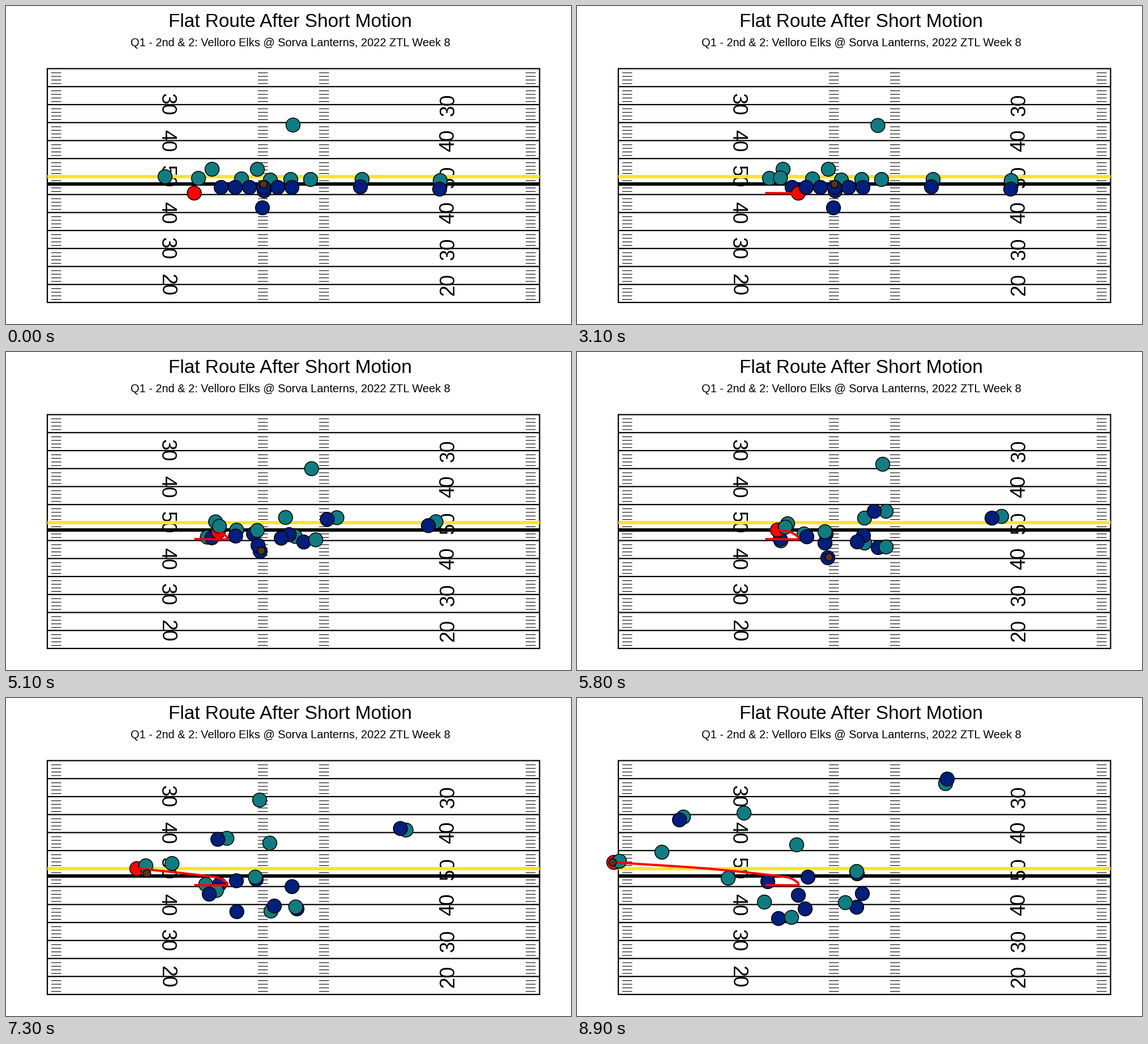
Write a matplotlib script that moves like this. It is 998x561 px and loops after 10 s.

```python
import numpy as np
import matplotlib.pyplot as plt
from matplotlib.animation import FuncAnimation
from matplotlib.patches import Circle, Rectangle

W, H, DPI = 998, 561, 64
PX = 72 / DPI                       # one pixel in points
START, SNAP, BREAK, CATCH, END = 10, 39, 58, 73, 89
TIME = np.arange(END + 1)

TEAL, NAVY, RED, BROWN = "#107c82", "#001e7b", "#ff0000", "#57341a"
YELLOW = "#ffe526"

LEFT, RIGHT, TOP, BOTTOM = 73, 942.5, 110.5, 523
STEP = (BOTTOM - TOP) / 13          # five yards

plt.rcParams["font.family"] = "Liberation Sans"
fig = plt.figure(figsize=(W / DPI, H / DPI), dpi=DPI, facecolor="white")
ax = fig.add_axes([0, 0, 1, 1])
ax.set_xlim(0, W)
ax.set_ylim(H, 0)
ax.axis("off")


def draw_field():
    ink = dict(color="black", snap=False, zorder=1)
    ax.hlines([TOP + k * STEP for k in range(1, 13)], LEFT, RIGHT, lw=2.2 * PX, **ink)
    ax.add_patch(Rectangle((LEFT, TOP), RIGHT - LEFT, BOTTOM - TOP, fill=False,
                           lw=2.2 * PX, **ink))
    yards = [TOP + 1 + k * STEP / 5 for k in range(65) if k % 5]
    for x in (80, 445, 553, 918):
        ax.hlines(yards, x, x + 17.5, lw=1.1 * PX, **ink)
    for k, label in enumerate(("30", "40", "50", "40", "30", "20")):
        y = TOP + (2 + 2 * k) * STEP
        for x, turn in ((274, -90), (791.6, 90)):
            ax.text(x, y, label, size=35.5 * PX, rotation=turn, ha="center",
                    va="baseline", rotation_mode="anchor", zorder=2)
    for y, color in ((314, "black"), (301, YELLOW)):
        ax.hlines(y, LEFT, RIGHT, color=color, lw=6 * PX, snap=False, zorder=3)


def draw_titles():
    ax.text(501.5, 37, "Flat Route After Short Motion", size=33.4 * PX,
            ha="center", va="baseline")
    ax.text(502, 70.7, "Q1 - 2nd & 2: Velloro Elks @ Sorva Lanterns, 2022 ZTL Week 8",
            size=20 * PX, ha="center", va="baseline")


def smooth(keys, vals):
    """Cubic curve over TIME that never overshoots its key values."""
    keys, vals = np.array(keys, float), np.array(vals, float)
    gap = np.diff(keys)
    sec = np.diff(vals) / gap
    a, b = sec[:-1], sec[1:]
    same = a * b > 0
    inner = np.where(same, 2 * a * b / np.where(same, a + b, 1), 0)
    slope = np.concatenate([sec[:1], inner, sec[-1:]])
    t = np.clip(TIME, keys[0], keys[-1])
    i = np.clip(np.searchsorted(keys, t, side="right") - 1, 0, len(gap) - 1)
    h = gap[i]
    u = (t - keys[i]) / h
    return ((1 + 2 * u) * (1 - u) ** 2 * vals[i] + u * (1 - u) ** 2 * h * slope[i]
            + u * u * (3 - 2 * u) * vals[i + 1] + u * u * (u - 1) * h * slope[i + 1])


def run(*points, times=None):
    """Path through a few points, from the snap to the end of the play."""
    if times is None:
        times = (SNAP, BREAK, END) if len(points) == 3 else (SNAP, BREAK, CATCH, END)
    return np.column_stack([smooth(times, axis) for axis in zip(*points)])


def mark(path, start, mid, end):
    """A defender keeps a slowly changing gap to the opponent on this path."""
    return path + run(start, mid, end)


def ramp(a, b):
    return np.clip((TIME - a) / (b - a), 0, 1)[:, None]


def line_spot(i):
    return 380 + 25 * i, 320


# Offense
early = (START, 43, BREAK, CATCH, END)
motion = run((332.5, 330), (391, 330.5), (391, 327), (375, 317), (354, 314),
             (231, 301), (65, 290), times=(START, 26, 43, 51, BREAK, CATCH, END))
passer = run((456, 326), (443, 363), (356, 389))
back = run((453, 356), (438, 337), (359, 346), (391, 348))
wide = run((766, 323), (733, 293), (654, 143))
slot = run((626, 319), (525, 281), (181, 215))
tight = run(line_spot(0), (359, 330), (377, 329), (337, 324))
tackle_l = run(line_spot(1), (406, 326), (408, 316))
guard_l = run(line_spot(2), (440, 321), (442, 320), (495, 310))
center = run(line_spot(3), (495, 335), (474, 367), (403, 372))
guard_r = run(line_spot(4), (506, 324), (504, 345))
tackle_r = run(line_spot(5), (532, 345), (514, 372), (494, 369))

# Defense
rush_end = mark(tight, (-40, -16), (1, 3), (-70, -6))
rush_l = mark(passer, (-40, -21), (-42, -42), (-25, -29))
nose = mark(guard_l, (37, -13), (-2, -4), (-1, -4))
rush_mid = mark(center, (48, -14), (13, 2), (-24, 15))
rush_r = mark(tackle_r, (33, -14), (14, -1), (-20, -8))
nickel = mark(slot, (3, -13), (21, 0), (7, -5))
corner_r = mark(wide, (1, -15), (17, -3), (-3, 8))
mike = run((444, 288), (508, 293), (466, 256), (388, 259))
will = run((364, 288), (372, 303), (150, 272))
corner_l = run((281, 301), (381, 305), (368, 309), (247, 296), (75, 288), times=early)
safety = run((507, 210), (539, 211), (540, 198), (448, 180), (295, 203), times=early)

# Ball: snapped to the passer, thrown to the man in motion, carried by him.
ball = np.array([455, 314.3]) + 0 * motion
ball += (passer + (2, -1) - ball) * ramp(SNAP, 43)
ball += (motion - (2, 0) - ball) * ramp(65, 74)

# From the bottom of the pile to the top.
pile = (
    (NAVY, passer), (TEAL, rush_end), (NAVY, tight), (RED, motion),
    (TEAL, rush_mid), (TEAL, rush_l), (NAVY, guard_l), (NAVY, tackle_l),
    (NAVY, back), (TEAL, nose), (NAVY, guard_r), (NAVY, center),
    (NAVY, tackle_r), (TEAL, rush_r), (TEAL, nickel), (TEAL, corner_r),
    (TEAL, mike), (NAVY, slot), (NAVY, wide), (TEAL, safety),
    (TEAL, will), (TEAL, corner_l),
)


def disc(path, color, radius, z):
    patch = Circle(path[START], radius, fc=color, ec="black", lw=1.5 * PX, zorder=z)
    return ax.add_patch(patch), path


draw_field()
draw_titles()
movers = [disc(path, color, 12.4, 5 + k / 100) for k, (color, path) in enumerate(pile)]
movers.append(disc(ball, BROWN, 6.6, 8))
trail, = ax.plot([], [], color=RED, lw=4 * PX, solid_capstyle="butt",
                 solid_joinstyle="round", zorder=7)


def update(n):
    n = min(max(n, START), END)
    for patch, path in movers:
        patch.center = path[n]
    done = motion[START:n + 1] if n > START else motion[:0]
    trail.set_data(done[:, 0], done[:, 1])
    return [trail] + [patch for patch, _ in movers]


anim = FuncAnimation(fig, update, frames=100, interval=100,
                     init_func=lambda: update(0), repeat=True, repeat_delay=0)
plt.show()
```
